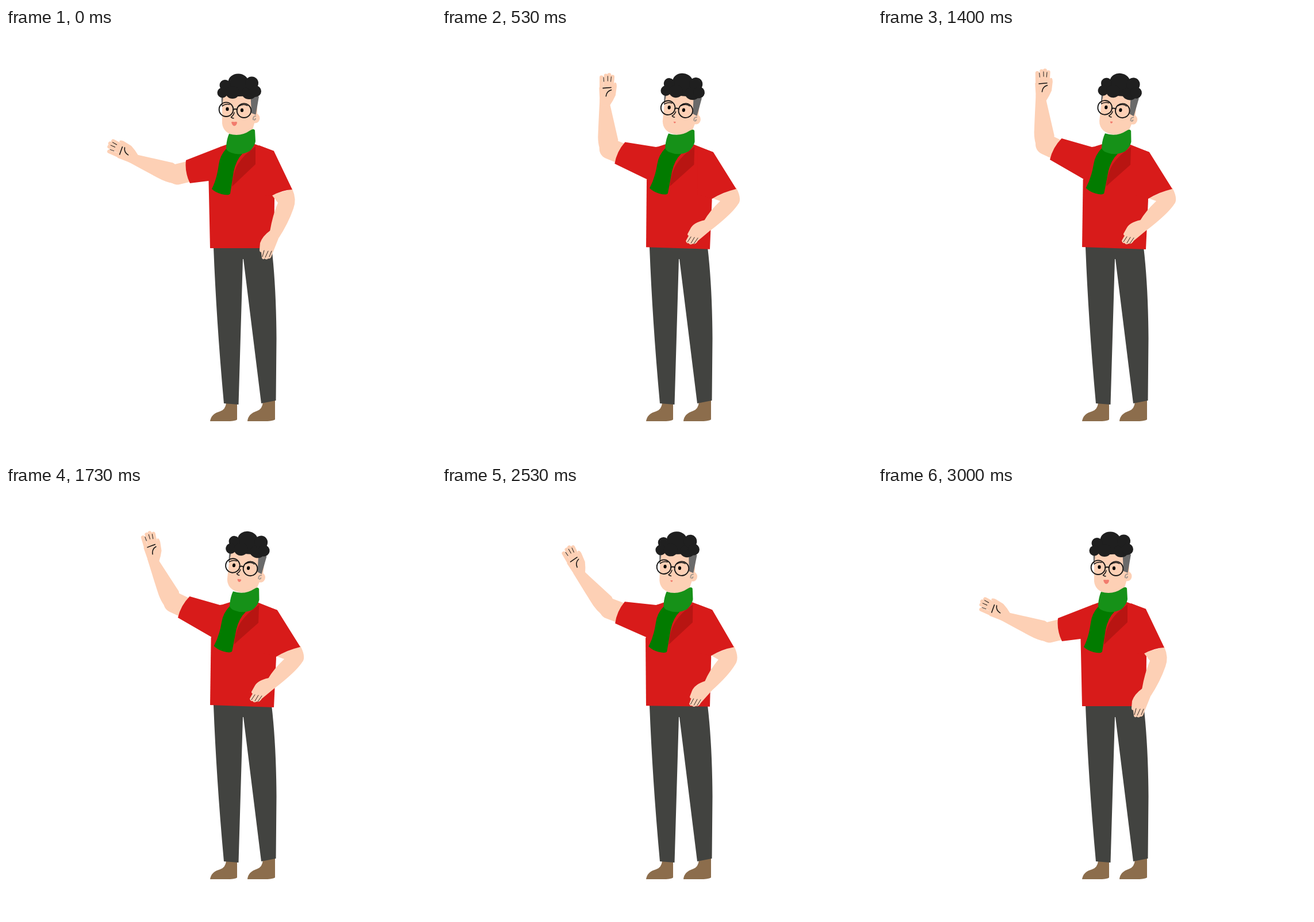
These frames come from a looping animation (748 px wide and 748 px high, 3.03 s). An HTML page:

```html
<!DOCTYPE html>
<html lang="en">
<head>
<meta charset="utf-8">
<title>Waving man</title>
<style>
  html, body { margin: 0; width: 100%; height: 100%; overflow: hidden; background: #fff; }
  svg { display: block; width: 100%; height: 100%; }
  .skin { fill: #fdd0b5; }
  .skin-line { fill: none; stroke: #fdd0b5; stroke-linecap: round; }
  .shirt { fill: #d81b1a; }
  .hair { fill: #1f1f1f; }
  .ink { fill: none; stroke: #151515; stroke-width: 1.5; stroke-linecap: round; }
  .thin { stroke-width: 0.9; }
</style>
</head>
<body>
<svg viewBox="0 0 748 748">
  <g fill="#8c6d4c">
    <path d="M383 652Q382 664 372 667Q357 671 355 684L390 684Q401 683 402 681V653Z"/>
    <path d="M447 650Q446 663 437 666Q421 671 420 684L455 684Q466 683 468 681V647Z"/>
  </g>
  <path fill="#424340" d="M361 381H462Q470 450 470.500 540L469.500 648L444 653L413 402H412L404.500 655L379 653Q366 510 361 381Z"/>

  <path id="stub" class="skin-line" stroke-width="36"/>
  <path id="forearm" class="skin" d="M-9.500 -88Q-15 -50 -18.500 -22Q-20 0 -12 10L10 10L16 -14L7.500 -76L9 -88Z"/>
  <g id="hand">
    <path class="skin" d="M-9 8L-10.500 -22L14 -26L15 -30Q19 -32 19 -24L17 -9Q13 0 8 7Z"/>
    <path class="skin-line" stroke-width="6.500" d="M-6.500 -19L-6.500 -39M0 -19L.8 -42M6 -19L6.500 -43M10.500 -20L12 -40"/>
    <path class="ink thin" d="M-2.500 -32L-3 -39M4 -33L4 -41M9 -32L9.800 -40"/>
    <path class="ink" d="M-4 -21L9.500 -22M10 -18Q2 -16 1 -7.500"/>
  </g>

  <g class="torso">
    <path class="shirt" d="M383 203L433 202L466 214L467 300L466 383H355L352.500 266L372 207Z"/>
  </g>
  <path id="leftSleeve" class="shirt"/>
  <path id="rightArm" class="skin"/>
  <path id="rightSleeve" class="shirt"/>
  <path id="rightHand" class="skin"/>
  <path id="rightFingers" class="ink thin"/>

  <g id="head">
    <path class="skin" d="M376 116V166Q378 182 395 186Q415 190 429 176L437 150V116Z"/>
    <ellipse class="skin" cx="434" cy="157" rx="7.500" ry="8.500"/>
    <path fill="#6a6a6a" d="M425.500 119L440 119L434.500 151L427 148ZM374.500 118H378L376.500 135H375Z"/>
    <path fill="none" stroke="#a79a90" stroke-width="2" d="M430 160Q429 153 435 153M431 160Q434 160 434 157"/>
    <g class="hair">
      <ellipse cx="405" cy="105" rx="32" ry="14"/>
      <ellipse cx="404" cy="94" rx="17.500" ry="14.500"/>
      <circle cx="381" cy="99.500" r="9.500"/>
      <circle cx="376.500" cy="112.500" r="9"/>
      <ellipse cx="394" cy="112" rx="12" ry="11"/>
      <ellipse cx="423" cy="113" rx="13" ry="11"/>
      <circle cx="427.500" cy="96" r="11.500"/>
      <circle cx="434" cy="110" r="10"/>
    </g>
    <ellipse cx="385" cy="141" rx="2.600" ry="3.200"/>
    <ellipse cx="410.500" cy="143" rx="2.600" ry="3.200"/>
    <g class="ink" style="stroke-width:1.900">
      <circle cx="383" cy="141.700" r="12.300"/>
      <circle cx="414" cy="143.700" r="12.300"/>
      <path d="M395 142Q398.500 140 402 142"/>
    </g>
    <path class="ink" d="M376 136Q382 131 389 133M405 136Q413 131 420 135M397 147Q396 152 391.500 155Q393 157 396 157"/>
    <path id="mouth" fill="#f27b6d" d="M-5 -2Q-2 -3 0 -2Q2 -3 5 -2Q5 4 0 5Q-4 4 -5 -2Z"/>
  </g>

  <g class="torso">
    <path fill="#b81512" d="M434 206V237L393 276Q394 252 404 236Q414 220 434 206Z"/>
    <path fill="#027b00" d="M383 210L411 219Q400 230 396 250L390 288Q388 292 375 289Q364 286 358 280Q367 262 370 238Q372 222 383 210Z"/>
    <path fill="#169118" d="M388 184Q408 190 425 178Q431 174 433 178L434 197Q433 205 424 214Q408 223 392 217Q382 214 383 206Q384 193 388 184Z"/>
  </g>
</svg>
<script>
const LOOP = 3030;
const $ = id => document.getElementById(id);
const torsoParts = document.querySelectorAll('.torso');

const lerp = (a, b, p) => a + (b - a) * p;
const ease = u => u * u * (3 - 2 * u);

// Eased value of [time, value] keys
function track(keys, t) {
  const i = keys.findIndex(([time]) => time > t);
  if (i < 0) return keys[keys.length - 1][1];
  const [t0, v0] = keys[i - 1], [t1, v1] = keys[i];
  return lerp(v0, v1, ease((t - t0) / (t1 - t0)));
}

// Blend of two path strings with the same commands
function blend([low, high], p) {
  const ends = high.match(/-?[\d.]+/g);
  let i = 0;
  return low.replace(/-?[\d.]+/g, n => lerp(+n, +ends[i++], p).toFixed(2));
}

// Each pair: arm lowered, arm raised
const shapes = {
  rightArm: [
    'M498 280Q506 298 500 314Q491 340 474 366L459 354Q464 325 473 304L462 290Z',
    'M512 278Q521 295 517 304Q506 322 467 352L456 335Q466 318 484 301L470 296Z'],
  rightSleeve: [
    'M440 204L466 214L498 281Q480 282 462 292L440 290Z',
    'M445 206L472 216L512 280Q490 285 470 297L445 290Z'],
  rightHand: [
    'M460 352Q446 362 442 374L441 386Q441 390 444 390L445 400Q447 404 450 401Q453 404 456 401Q461 402 462 396L474 366Z',
    'M457 334Q437 338 432 349L427 358Q427 361 429 361L424 370Q425 375 429 374Q431 378 436 375Q441 377 445 370L468 351Z'],
  rightFingers: [
    'M449 387L446 398M456 388L451 399M462 388L458 398',
    'M433 363L427 372M439 364L433 374M445 365L438 375']
};

const leftArmKeys = [[0, 0], [720, 1], [2310, 1], [3000, 0]];
const rightArmKeys = [[0, 0], [560, 1], [2270, 1], [3000, 0]];
const torsoKeys = [[0, 0], [690, 1], [1900, 1], [3000, 0]];
const headKeys = [[0, 0], [690, 1], [1600, 1], [3000, 0]];
const forearmKeys = [[0, 69.5], [520, 5], [830, 28], [1333, 4], [1850, 28.5], [2310, 30], [3000, 69.5]];
const handKeys = [[0, 66], [520, 0], [830, 19], [1333, 0], [1850, 19], [2310, 19], [3000, 66]];

function drawLeftArm(t) {
  const p = track(leftArmKeys, t);
  const bulge = 16 * p * (1 - p);
  const ax = lerp(313, 319.5, p), ay = lerp(230, 192, p);
  const bx = lerp(320, 299, p) - bulge, by = lerp(270, 229, p);
  const mx = (ax + bx) / 2, my = (ay + by) / 2;
  const width = Math.hypot(bx - ax, by - ay);
  const nx = (ay - by) / width, ny = (bx - ax) / width;

  $('leftSleeve').setAttribute('d',
    `M${ax} ${ay}L372 207L${lerp(385, 390, p)} 204L383 264` +
    `L${lerp(352, 357, p)} ${lerp(266, 262.5, p)}L${bx} ${by}Q${mx + nx * 6} ${my + ny * 6} ${ax} ${ay}Z`);

  const ex = mx + nx * 19 + (bx - ax) * 0.03, ey = my + ny * 19 + (by - ay) * 0.03;
  const bend = track(forearmKeys, t), angle = bend * Math.PI / 180;
  const wx = ex - 84 * Math.sin(angle), wy = ey - 84 * Math.cos(angle);
  $('stub').setAttribute('d', `M${ex} ${ey}L${mx} ${my}`);
  $('forearm').setAttribute('transform', `translate(${ex} ${ey}) rotate(${-bend})`);
  $('hand').setAttribute('transform', `translate(${wx} ${wy}) rotate(${-track(handKeys, t)}) scale(1.04)`);
}

function draw(t) {
  drawLeftArm(t);
  const raised = track(rightArmKeys, t);
  for (const id in shapes) $(id).setAttribute('d', blend(shapes[id], raised));

  const lean = `rotate(${2 * track(torsoKeys, t)} 410 383)`;
  torsoParts.forEach(part => part.setAttribute('transform', lean));
  $('head').setAttribute('transform', `rotate(${6.4 * track(headKeys, t)} 418 245)`);

  const open = (1 + Math.cos(2 * Math.PI * t / 1000)) / 2;
  $('mouth').setAttribute('transform', `translate(397 165.5) scale(${lerp(0.4, 1, open)})`);
}

const start = performance.now();
function tick() {
  draw((performance.now() - start) % LOOP);
  requestAnimationFrame(tick);
}
tick();
</script>
</body>
</html>
```
